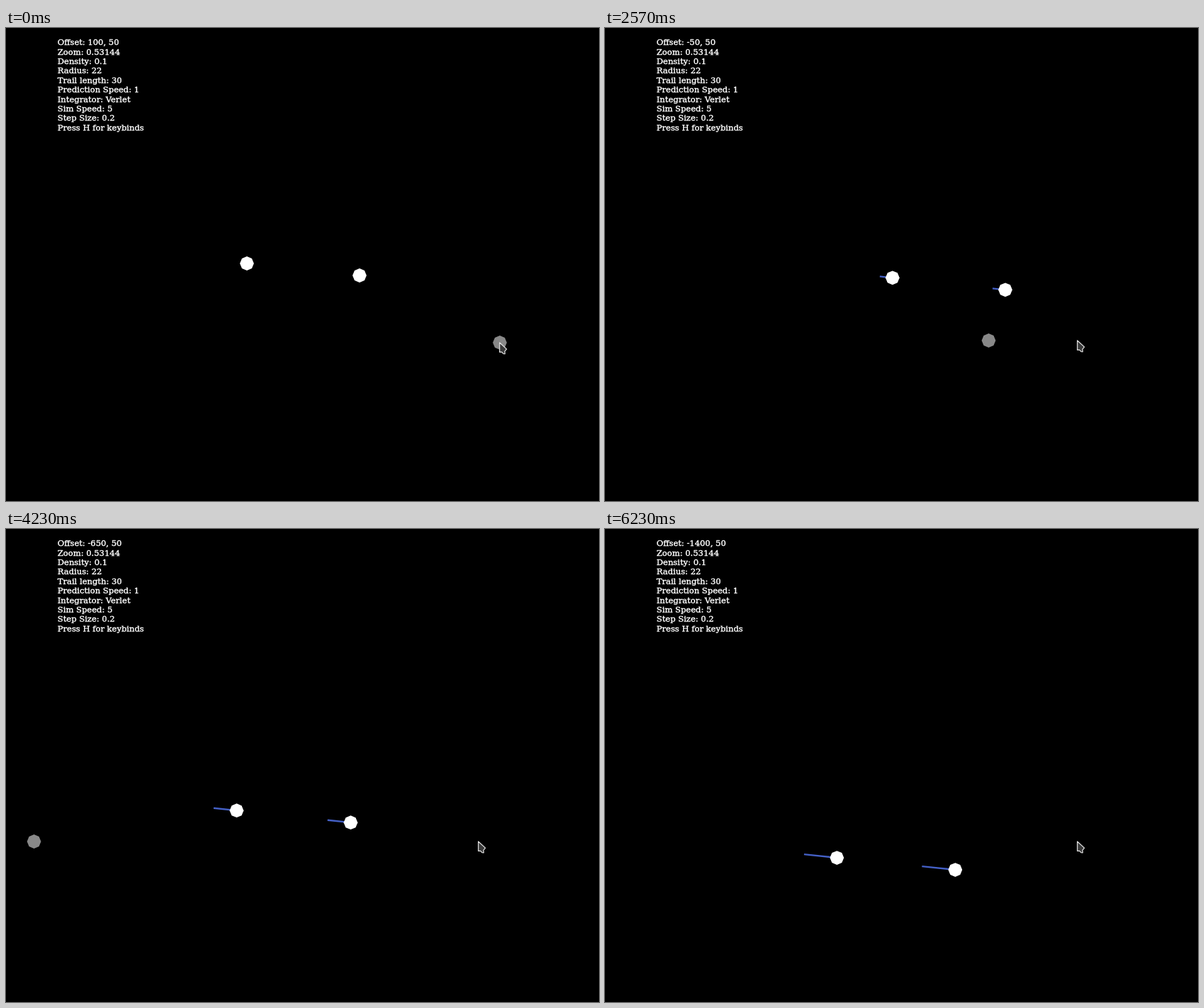
Write an HTML page with a canvas that moves like this. It is 837 px wide and 669 px high and loops after 6260 ms.

```html
<!DOCTYPE html>
<html lang="en">
<head>
<meta charset="utf-8">
<title>Gravity simulation</title>
<style>
html, body { margin: 0; width: 100%; height: 100%; overflow: hidden; background: #000; }
canvas { display: block; }
</style>
</head>
<body>
<canvas id="stage" width="837" height="669"></canvas>
<script>
const W = 837, H = 669, LOOP = 6260;
const ctx = document.getElementById('stage').getContext('2d');

const PAN_PX = 41.83;          // screen shift of one pan step
const PAN_UNITS = 50;          // offset change of one pan step
const PAN_EVERY = 33.3;        // ms between steps while the key is held
const HOLDS = [[2240, 3], [2710, 4], [3965, 14], [4600, 9]]; // start, steps

const START = 470, PAUSE = 5824, RATE = 0.006583, TRAIL = 101;
const RADIUS = 9.9, SIDES = 8, SLOPE = 0.1063;

const POINTER = [
  [0, 697, 445], [120, 697, 445], [320, 698, 451],
  [700, 684, 445.5], [1250, 667, 442], [LOOP, 667, 442]
];
const ARROW = [[0, 0], [0, 13.4], [3.2, 13.3], [5.2, 15.6], [7.6, 15.8], [7.2, 12.4], [9.9, 9.1]];

const SERIF = '"DejaVu Serif", "Noto Serif", serif';
const FONT = pickFont();

// Noto Serif runs narrower, so it needs a larger size.
function pickFont() {
  const width = family => {
    ctx.font = '40px ' + family;
    return ctx.measureText('Press H').width;
  };
  const found = width('"DejaVu Serif", monospace') !== width('monospace');
  return (found ? 11.55 : 12.1) + 'px ' + SERIF;
}

function panSteps(t) {
  return HOLDS.reduce((sum, [at, count]) => {
    const done = Math.floor((t - at) / PAN_EVERY) + 1;
    return sum + Math.max(0, Math.min(count, done));
  }, 0);
}

function pointerAt(t) {
  const i = POINTER.findIndex(p => p[0] > t);
  const [t0, x0, y0] = POINTER[i - 1], [t1, x1, y1] = POINTER[i];
  const k = (t - t0) / (t1 - t0);
  return [x0 + (x1 - x0) * k, y0 + (y1 - y0) * k];
}

// Distance fallen from rest under a steady pull.
function travel(t) {
  return (RATE * Math.max(0, t - START)) ** 2;
}

function firstBody(d) {
  return [340 + d, 333 + SLOPE * d];
}

function secondBody(d) {
  return [499 + d + 5.2e-6 * d * d, 350 + SLOPE * d];
}

function tracePath(points) {
  ctx.beginPath();
  points.forEach(([x, y]) => ctx.lineTo(x, y));
  ctx.closePath();
}

function drawBall(x, y, color) {
  const corners = Array.from({ length: SIDES }, (_, i) => {
    const a = i * 2 * Math.PI / SIDES;
    return [x + RADIUS * Math.cos(a), y + RADIUS * Math.sin(a)];
  });
  tracePath(corners);
  ctx.fillStyle = color;
  ctx.fill();
}

function drawBody(place, t, shift) {
  const [x, y] = place(travel(t));
  const [tx, ty] = place(travel(t - TRAIL));
  ctx.strokeStyle = '#4460c6';
  ctx.lineWidth = 2.4;
  ctx.beginPath();
  ctx.moveTo(tx - shift, ty);
  ctx.lineTo(x - shift, y);
  ctx.stroke();
  drawBall(x - shift, y, '#fff');
}

function drawPointer(x, y) {
  tracePath(ARROW.map(([ax, ay]) => [x + ax - 0.3, y + ay]));
  ctx.fillStyle = '#3a3a3a';
  ctx.fill();
  ctx.strokeStyle = '#e6e6e6';
  ctx.lineWidth = 1.2;
  ctx.lineJoin = 'round';
  ctx.stroke();
}

function drawText(offset) {
  const lines = [
    `Offset: ${offset}, 50`,
    'Zoom: 0.53144',
    'Density: 0.1',
    'Radius: 22',
    'Trail length: 30',
    'Prediction Speed: 1',
    'Integrator: Verlet',
    'Sim Speed: 5',
    'Step Size: 0.2',
    'Press H for keybinds'
  ];
  ctx.font = FONT;
  ctx.fillStyle = ctx.strokeStyle = '#fff';
  ctx.lineWidth = 0.4;
  lines.forEach((line, i) => {
    const y = 24.2 + 13.39 * i;
    ctx.fillText(line, 72.8, y);
    ctx.strokeText(line, 72.8, y);
  });
}

function draw(t) {
  ctx.fillStyle = '#000';
  ctx.fillRect(0, 0, W, H);
  const steps = panSteps(t), shift = steps * PAN_PX;
  const simTime = Math.min(t, PAUSE);
  const [px, py] = pointerAt(t);
  drawBody(firstBody, simTime, shift);
  drawBody(secondBody, simTime, shift);
  drawBall(px - shift, py, '#888');
  drawText(100 - steps * PAN_UNITS);
  drawPointer(px, py);
}

const begin = performance.now();
function tick() {
  draw((performance.now() - begin) % LOOP);
  requestAnimationFrame(tick);
}
tick();
</script>
</body>
</html>
```
